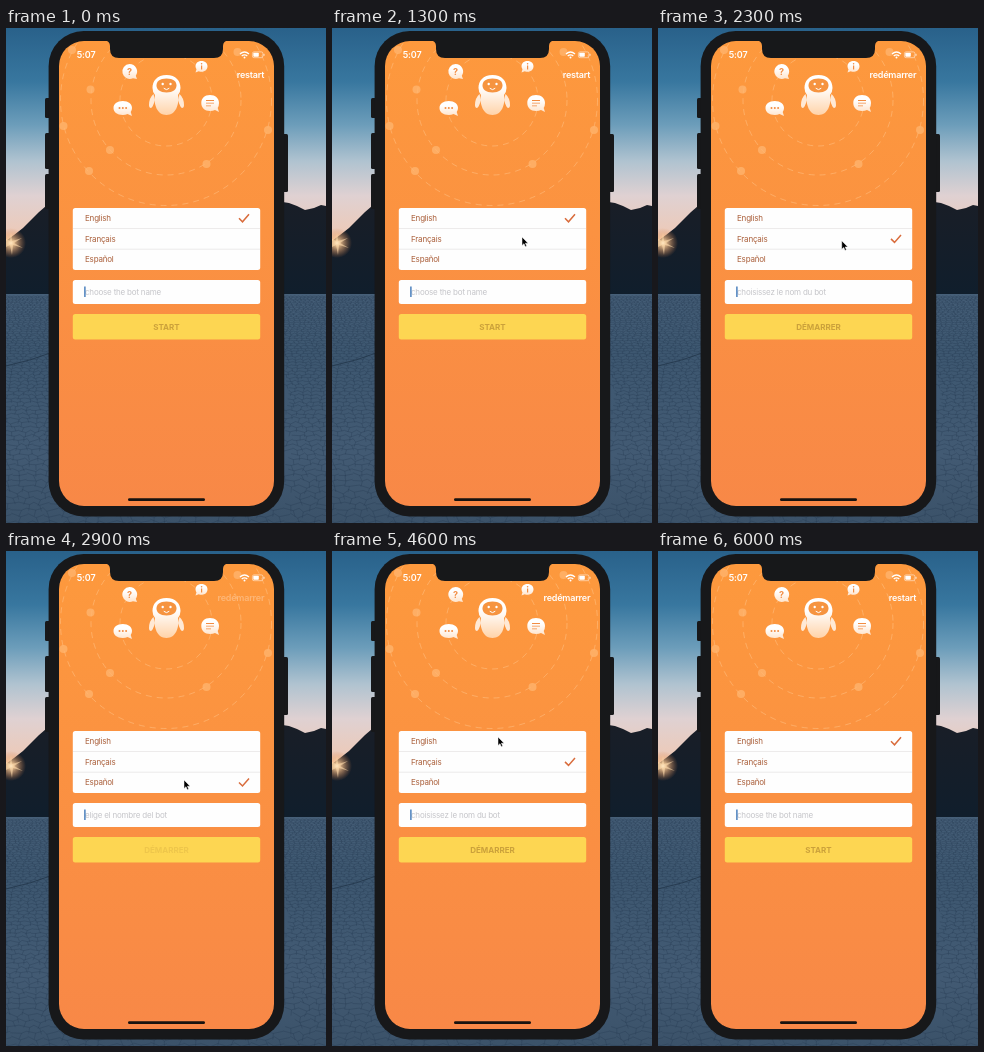
An HTML page that plays this animation: 320 px wide and 495 px high, repeating every 6.1 s.

```html
<!DOCTYPE html>
<html lang="en">
<head>
<meta charset="utf-8">
<title>Bot language picker</title>
<style>
  html, body { margin: 0; width: 100%; height: 100%; overflow: hidden; background: #2f485f; }
  svg { display: block; width: 320px; height: 495px; }
  text { font-family: Inter, "Open Sans", sans-serif; }
  .row { font-size: 8px; letter-spacing: -.2px; fill: #a95d38; }
  .hint { font-size: 8px; letter-spacing: -.2px; fill: #c5c5c9; }
  .nav { font-size: 9px; font-weight: 600; letter-spacing: -.2px; fill: #fff; text-anchor: end; }
  .start { font-size: 8px; font-weight: 700; fill: #cba13b; text-anchor: middle; }
  .orbit { fill: none; stroke: #ffc487; stroke-width: .8; stroke-dasharray: 6 5; opacity: .65; }
</style>
</head>
<body>
<svg viewBox="0 0 320 495">
  <defs>
    <linearGradient id="sky" gradientUnits="userSpaceOnUse" x1="0" x2="0" y1="0" y2="215">
      <stop offset="0" stop-color="#29618a"/>
      <stop offset=".25" stop-color="#38779f"/>
      <stop offset=".45" stop-color="#6c9dba"/>
      <stop offset=".62" stop-color="#b0c3d0"/>
      <stop offset=".78" stop-color="#dfd1d2"/>
      <stop offset="1" stop-color="#f0c8b2"/>
    </linearGradient>
    <linearGradient id="ground" x2="0" y2="1">
      <stop offset="0" stop-color="#465f78"/>
      <stop offset=".25" stop-color="#3d5770"/>
      <stop offset=".7" stop-color="#425a73"/>
      <stop offset="1" stop-color="#3b5269"/>
    </linearGradient>
    <linearGradient id="hill" x2="0" y2="1">
      <stop offset="0" stop-color="#191e27"/>
      <stop offset="1" stop-color="#101e2c"/>
    </linearGradient>
    <radialGradient id="sun">
      <stop offset="0" stop-color="#fff6dc"/>
      <stop offset=".2" stop-color="#ffd09a" stop-opacity=".85"/>
      <stop offset="1" stop-color="#d47b45" stop-opacity="0"/>
    </radialGradient>
    <linearGradient id="screen" x2="0" y2="1">
      <stop offset="0" stop-color="#fd993d"/>
      <stop offset="1" stop-color="#f88847"/>
    </linearGradient>
    <linearGradient id="white" x2="0" y2="1">
      <stop offset=".3" stop-color="#fff"/>
      <stop offset="1" stop-color="#ffe4cc"/>
    </linearGradient>
    <linearGradient id="body" x2="0" y2="1">
      <stop offset=".3" stop-color="#fff"/>
      <stop offset="1" stop-color="#ffd3a9"/>
    </linearGradient>
    <clipPath id="glass"><rect x="53" y="13" width="215" height="465" rx="25"/></clipPath>
  </defs>

  <!-- desert at dawn -->
  <rect width="320" height="267" fill="url(#sky)"/>
  <rect y="266" width="320" height="229" fill="url(#ground)"/>
  <path id="cracks" fill="none" stroke="#22384e" stroke-width=".6" opacity=".5"/>
  <path d="M0 338Q24 333 50 323" fill="none" stroke="#22364a" stroke-width="1" opacity=".8"/>
  <path d="M0 213 8 207 17 200 25 192 33 184 40 178 50 174V266H0Z" fill="url(#hill)"/>
  <path d="M270 173 283 175 291 178 299 182 308 180 315 177 320 178V266H270Z" fill="url(#hill)"/>
  <circle cx="5" cy="215" r="15" fill="url(#sun)"/>
  <path d="M5 204 6 213 16 210 8 215 17 220 7 217 6 227 4 217 0 219V211L4 213Z" fill="#ffdcae" opacity=".6"/>

  <!-- phone -->
  <g fill="#17181a">
    <rect x="39" y="70" width="6" height="20" rx="1.5"/>
    <rect x="39" y="105" width="6" height="36" rx="1.5"/>
    <rect x="39" y="146" width="6" height="35" rx="1.5"/>
    <rect x="276" y="106" width="6" height="58" rx="1.5"/>
    <rect x="42.600" y="3" width="235.600" height="485.500" rx="35"/>
  </g>
  <rect x="53" y="13" width="215" height="465" rx="25" fill="url(#screen)"/>

  <g clip-path="url(#glass)">
    <circle class="orbit" cx="160" cy="72" r="46"/>
    <circle class="orbit" cx="160" cy="72" r="75"/>
    <circle class="orbit" cx="160" cy="72" r="105.500"/>
    <g fill="#ffb671" opacity=".75">
      <circle cx="104" cy="122" r="4"/><circle cx="200.500" cy="136" r="4"/>
      <circle cx="83" cy="143" r="4"/><circle cx="57.500" cy="98" r="4"/>
      <circle cx="262" cy="102" r="4"/><circle cx="84.500" cy="61.500" r="4"/>
      <circle cx="66" cy="22" r="4"/><circle cx="231.500" cy="24" r="4"/>
    </g>
  </g>
  <path d="M98 12Q104 13 104 18V21Q104 30 113 30H208Q217 30 217 21V18Q217 13 223 12Z" fill="#17181a"/>

  <!-- status bar -->
  <text x="70.700" y="30" font-size="9" font-weight="600" letter-spacing="-.1" fill="#fff">5:07</text>
  <g fill="none" stroke="#fff" stroke-width="1.300">
    <path d="M234 26Q238.500 22 243 26M235.700 28Q238.500 25.600 241.300 28"/>
    <rect x="246.400" y="23.900" width="10.500" height="5.800" rx="1.600" stroke-width=".7" opacity=".7"/>
  </g>
  <circle cx="238.500" cy="29.500" r="1" fill="#fff"/>
  <rect x="247.300" y="24.800" width="5.500" height="4" rx=".8" fill="#fff"/>
  <path d="M258 25.800v2" stroke="#fff" stroke-width=".8"/>

  <!-- bubbles -->
  <g fill="url(#white)">
    <path d="M123.500 36a7.500 7.500 0 1 0 3.500 14.300L131 51 129.800 47.700A7.500 7.500 0 0 0 123.500 36Z"/>
    <path d="M116.800 73C111 73 107.500 76 107.500 80S111 87 116.800 87Q119.500 87 121.500 86L126 88 124.700 84Q126 82.300 126 80C126 76 122.500 73 116.800 73Z"/>
    <path d="M204 67C198.500 67 195.300 70.500 195.300 75S198.500 83 204 83Q207 83 209 82L213 84 211.700 80Q213 78 213 75C213 70.500 209.500 67 204 67Z"/>
    <path d="M195.500 33C191.500 33 189.500 35.500 189.500 38.300Q189.500 40 190.500 41.300L189.500 44.500 192.800 43.300Q194 43.800 195.500 43.800C199.300 43.800 201.500 41.300 201.500 38.300S199.300 33 195.500 33Z"/>
  </g>
  <g fill="#f28c42">
    <text x="123.500" y="46.600" font-size="9" font-weight="700" text-anchor="middle">?</text>
    <circle cx="113.500" cy="80" r="1"/><circle cx="116.800" cy="80" r="1"/><circle cx="120.100" cy="80" r="1"/>
    <path d="M200 72h8v.9h-8zM200 74.700h8v.9h-8zM200 77.400h5v.9h-5zM195 37.500h1.200v4H195z"/>
    <circle cx="195.600" cy="35.800" r=".8"/>
  </g>

  <!-- robot -->
  <path d="M147.500 66Q143 70 143 77Q143 80 145 80Q147 79 149 72ZM173.500 66Q178 70 178 77Q178 80 176 80Q174 79 172 72Z" fill="#ffe9d5"/>
  <path d="M160.500 47C151 47 146.500 53 146.500 60Q146.500 64 149 67C147.500 76 151 87 160.500 87S173.500 76 172 67Q174.500 64 174.500 60C174.500 53 170 47 160.500 47Z" fill="url(#body)"/>
  <path d="M160.500 50.500C153.500 50.500 150.500 53.500 150.500 57.500S154 64.500 160.500 64.500 170.500 61.500 170.500 57.500 167.500 50.500 160.500 50.500Z" fill="#f69440"/>
  <g fill="#fff"><circle cx="156.700" cy="56" r="1.200"/><circle cx="164.500" cy="56" r="1.200"/></g>
  <path d="M158 60.500Q160.500 63 163 60.500" fill="none" stroke="#fff" stroke-linecap="round"/>

  <!-- form -->
  <g fill="#fefefe">
    <rect x="66.800" y="180" width="187.400" height="62" rx="2.500"/>
    <rect x="66.800" y="252" width="187.400" height="24" rx="2.500"/>
  </g>
  <path d="M67 200.500H254M67 221.200H254" stroke="#e9e6e6" stroke-width=".8"/>
  <text class="row" x="79" y="193">English</text>
  <text class="row" x="79" y="213.500">Français</text>
  <text class="row" x="79" y="234">Español</text>
  <path id="tick" d="M233 190.300 236.500 193.800 243 186.300" fill="none" stroke="#d96c3c" stroke-width="1.500"/>
  <text id="hint" class="hint" x="79" y="267"></text>
  <rect x="78.200" y="258.500" width="1.400" height="10.500" fill="#3f78b8"/>
  <rect x="66.800" y="286" width="187.400" height="25.500" rx="2.500" fill="#fdd652"/>
  <text id="start" class="start" x="160.500" y="301.500"></text>
  <text id="nav" class="nav" x="258.300" y="50.300"></text>
  <rect x="122" y="470.300" width="77" height="2.800" rx="1.400" fill="#17120f"/>

  <path id="cursor" d="M0 0V8.500L2 6.700 3.300 9.700 4.700 9.100 3.400 6.200H6.100Z" fill="#000" stroke="#fff" stroke-width=".5"/>
</svg>
<script>
const $ = id => document.getElementById(id);
const LOOP = 6100, FADE = 200;

const langs = [
  { nav: "restart", start: "START", hint: "choose the bot name" },
  { nav: "redémarrer", start: "DÉMARRER", hint: "choisissez le nom du bot" },
  { nav: "reiniciar", start: "COMENZAR", hint: "elige el nombre del bot" }
];

// [time, language]
const taps = [[-1000, 0], [1520, 1], [2760, 2], [3950, 1], [4780, 0]];

// [time, x, y] of the pointer tip
const path = [
  [350, 324, 330], [800, 245, 244], [1300, 190, 209], [1800, 188, 208],
  [2250, 184, 212], [2650, 178, 229], [3000, 178, 229], [3500, 168, 211],
  [3700, 167, 210], [4050, 167, 210], [4450, 166, 186], [4950, 166, 186], [5650, 325, 260]
];

const clamp = v => Math.max(0, Math.min(1, v));

function pointer(t) {
  let i = 0;
  while (i < path.length - 2 && t > path[i + 1][0]) i++;
  const [t0, x0, y0] = path[i], [t1, x1, y1] = path[i + 1];
  const p = clamp((t - t0) / (t1 - t0)), e = p * p * (3 - 2 * p);
  return [x0 + (x1 - x0) * e, y0 + (y1 - y0) * e];
}

function label(id, text, alpha) {
  const el = $(id);
  if (el.textContent !== text) el.textContent = text;
  el.style.opacity = alpha;
}

function draw(t) {
  const i = taps.findLastIndex(tap => tap[0] <= t);
  const [at, lang] = taps[i], age = t - at;
  // Titles fade out, then the new ones fade in
  const leaving = age < FADE;
  const shown = langs[leaving ? taps[i - 1][1] : lang];
  const alpha = leaving ? 1 - age / FADE : clamp(age / FADE - 1);
  label("nav", shown.nav, alpha);
  label("start", shown.start, alpha);
  label("hint", langs[lang].hint, 1);
  $("tick").setAttribute("transform", `translate(0 ${lang * 20.6})`);
  $("cursor").setAttribute("transform", `translate(${pointer(t)})`);
}

// Cracked ground: jittered cells that grow towards the viewer
function cracks() {
  const top = 268;
  let seed = 7, d = "";
  const rnd = () => (seed = seed * 16807 % 2147483647) / 2147483647 - .5;
  const pt = (x, y) => `${x.toFixed(1)} ${y.toFixed(1)}`;
  for (let y = top, h = 1.5; y < 495; y += h, h = 1.5 + (y - top) * .022) {
    const w = h * 2.6;
    for (let x = -w * (rnd() + .5); x < 320; x += w) {
      if (x > 46 && x < 274 && y < 480) continue;
      const mid = pt(x + w / 2 + rnd() * w * .5, y + h * (.4 + rnd() * .4));
      d += `M${pt(x, y + rnd() * h * .5)}L${mid}L${pt(x + w, y)}M${mid}l${pt(rnd() * h, h)}`;
    }
  }
  $("cracks").setAttribute("d", d);
}

function tick() {
  draw(performance.now() % LOOP);
  requestAnimationFrame(tick);
}

cracks();
tick();
</script>
</body>
</html>
```
